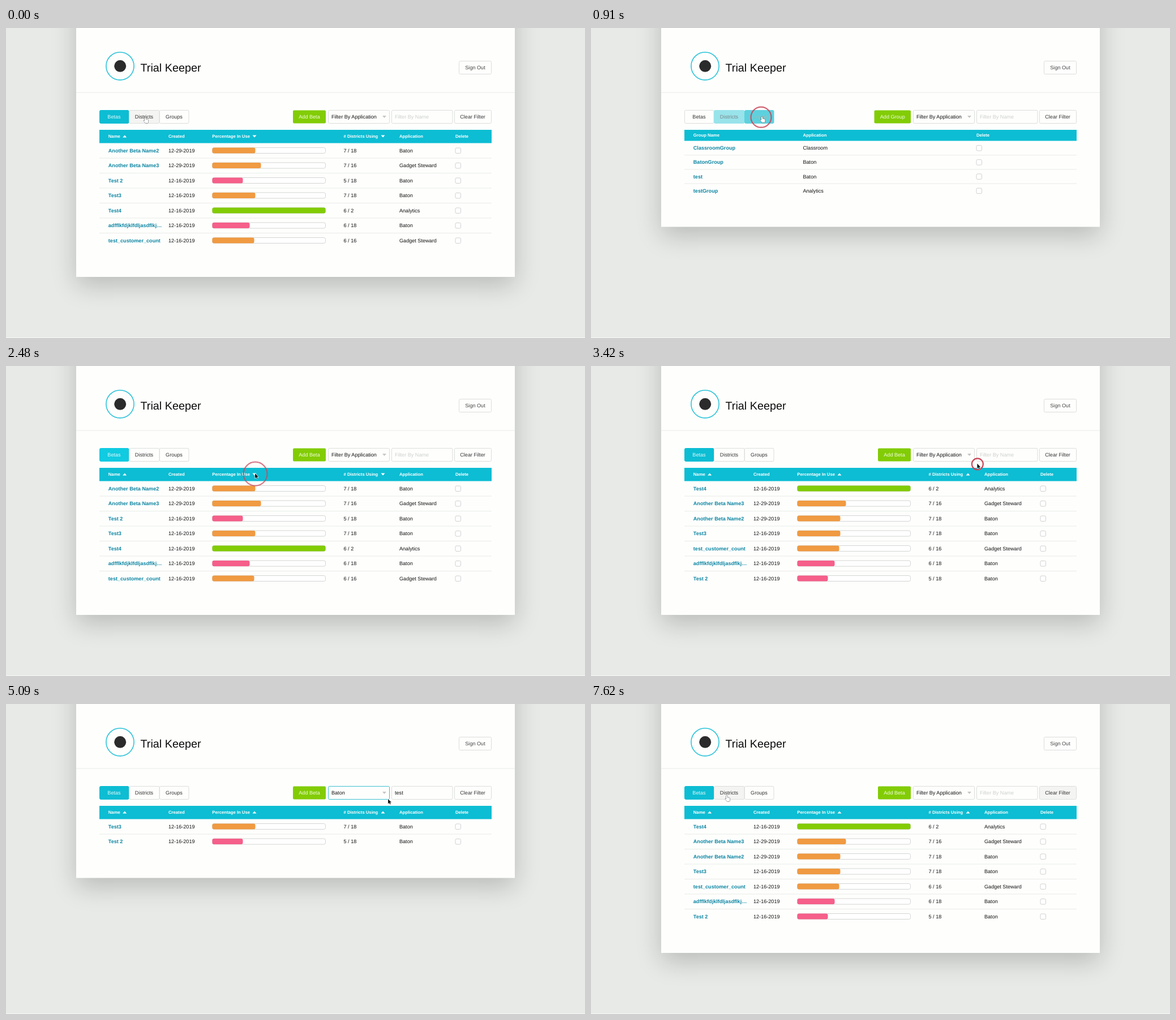
These frames come from a looping animation (1023 by 548 pixels, 8000 ms). An HTML page with a canvas:

```html
<!DOCTYPE html>
<html lang="en">
<head>
<meta charset="utf-8">
<title>Trial Keeper</title>
<style>
  html, body { margin: 0; width: 100%; height: 100%; overflow: hidden; background: #e7eae7; }
  canvas { display: block; }
</style>
</head>
<body>
<canvas id="stage" width="1023" height="548"></canvas>
<script>
const ctx = document.getElementById('stage').getContext('2d');
ctx.textRendering = 'geometricPrecision';

const LOOP = 8000;
const CYAN = [13, 189, 211], BRIGHT = [16, 203, 225], WHITE = [254, 255, 253];
const GREEN = '#82cc06', ORANGE = '#f09a42', PINK = '#f55f8a', BORDER = '#dcdedc';
const ROW_FONT = 9.1, HEAD_FONT = 7.7;

const TICKS = [
  0, 100, 260, 420, 580, 740, 910, 1030, 1160, 1310, 1460, 1610, 1760, 1920, 2070,
  2210, 2340, 2480, 2610, 2750, 2890, 3030, 3160, 3300, 3430, 3570, 3920, 4120, 4250,
  4520, 4660, 4800, 4950, 5090, 6100, 6240, 6380, 6520, 6670, 6840, 7000,
  7180, 7330, 7470, 7620
];

// Pointer tip: time, x, y
const PATH = [
  [0, 244, 158], [300, 244, 158], [740, 300, 157], [1100, 300, 157],
  [1460, 191, 158], [2070, 191, 158], [2340, 440, 190], [2610, 440, 190],
  [2890, 666, 190], [3160, 666, 190], [3430, 697, 157], [4250, 697, 157],
  [4660, 650, 157], [4800, 650, 157], [5090, 675, 168], [5950, 675, 168],
  [6520, 843, 152], [6840, 843, 152], [7000, 354, 138], [7620, 238, 162]
];
const CLICKS = [90, 750, 1500, 2260, 2900, 3300, 4560, 6580];

const BETAS = [
  ['Another Beta Name2', '12-29-2019', 38, '7 / 18', 'Baton'],
  ['Another Beta Name3', '12-29-2019', 43, '7 / 16', 'Gadget Steward'],
  ['Test 2', '12-16-2019', 27, '5 / 18', 'Baton'],
  ['Test3', '12-16-2019', 38, '7 / 18', 'Baton'],
  ['Test4', '12-16-2019', 100, '6 / 2', 'Analytics'],
  ['adfflkfdjklfdljasdflkj…', '12-16-2019', 33, '6 / 18', 'Baton'],
  ['test_customer_count', '12-16-2019', 37, '6 / 16', 'Gadget Steward']
];
const GROUPS = [
  ['ClassroomGroup', 'Classroom'], ['BatonGroup', 'Baton'],
  ['test', 'Baton'], ['testGroup', 'Analytics']
];
const DISTRICTS = Array.from({ length: 18 }, (_, i) =>
  ['District ' + (i + 1), ['Baton', 'Analytics', 'Classroom'][i % 3]]);

const rgb = c => `rgb(${c.map(Math.round).join()})`;
const mix = (a, b, k) => rgb(a.map((v, i) => v + (b[i] - v) * k));

function text(str, x, y, { size = ROW_FONT, color = '#111', bold = false, align = 'left' } = {}) {
  ctx.font = `${bold ? 'bold ' : ''}${size}px "Liberation Sans", Arial, sans-serif`;
  ctx.textAlign = align;
  ctx.fillStyle = color;
  ctx.fillText(str, x, y + size * 0.358);
}

function box(x, y, w, h, r, fill, stroke) {
  ctx.beginPath();
  ctx.roundRect(x, y, w, h, r);
  if (fill) { ctx.fillStyle = fill; ctx.fill(); }
  if (stroke) { ctx.strokeStyle = stroke; ctx.lineWidth = 1; ctx.stroke(); }
}

function line(x1, x2, y, color) {
  ctx.fillStyle = color;
  ctx.fillRect(x1, y, x2 - x1, 1);
}

function triangle(x, y, up, color = '#fff') {
  const d = up ? -2 : 2;
  ctx.beginPath();
  ctx.moveTo(x - 3.5, y - d);
  ctx.lineTo(x + 3.5, y - d);
  ctx.lineTo(x, y + d);
  ctx.fillStyle = color;
  ctx.fill();
}

const inside = (p, x1, x2) => p.x >= x1 && p.x < x2 && p.y >= 145 && p.y < 169;

function pointerAt(t) {
  let i = PATH.findIndex(p => p[0] > t);
  if (i < 0) i = PATH.length;
  const a = PATH[i - 1], b = PATH[i] || a;
  let k = b === a ? 0 : (t - a[0]) / (b[0] - a[0]);
  k = k * k * (3 - 2 * k);
  return { x: a[1] + (b[1] - a[1]) * k, y: a[2] + (b[2] - a[2]) * k };
}

function stateAt(t) {
  const page = t < 260 || t >= 1760 ? 'Beta' : t < 910 ? 'District' : 'Group';
  const names = ['Beta', 'District', 'Group'];
  const active = names.map(n => n === page ? 1 : 0);
  // A tab change takes one refresh to fade through.
  const fades = { 260: [0, 1], 910: [1, 2], 1760: [2, 0] };
  if (fades[t]) {
    active[fades[t][0]] = 0.42;
    active[fades[t][1]] = 0.65;
  }
  const cleared = t >= 6840;
  return {
    page, active,
    bright: t >= 1920 && t < 2610,
    byUse: t >= 2610,
    byDistricts: t >= 3160,
    query: cleared || t < 3920 ? '' : t < 4120 ? 'te' : t < 4250 ? 'tes' : 'test',
    app: t >= 4950 && !cleared ? 'Baton' : '',
    inputFocus: t >= 3430 && t < 4660,
    selectFocus: t >= 4660 && !cleared,
    clearFocus: t >= 6520,
    pointer: pointerAt(t)
  };
}

function card(bottom) {
  ctx.save();
  ctx.shadowColor = 'rgba(0,0,0,.2)';
  ctx.shadowBlur = 42;
  ctx.shadowOffsetY = 15;
  ctx.fillStyle = rgb(WHITE);
  ctx.fillRect(124, -80, 775, bottom + 80);
  ctx.restore();

  ctx.beginPath();
  ctx.arc(201.5, 67.3, 24.6, 0, 7);
  ctx.strokeStyle = '#2cc3d8';
  ctx.lineWidth = 1.6;
  ctx.stroke();
  ctx.beginPath();
  ctx.arc(201.7, 67.3, 10.5, 0, 7);
  ctx.fillStyle = '#2b2b2b';
  ctx.fill();

  text('Trial Keeper', 237.5, 69.5, { size: 19.8, color: '#0a0a0a' });
  box(800.5, 58.5, 57, 23, 2, null, BORDER);
  text('Sign Out', 829, 70, { color: '#444', align: 'center' });
  line(124, 899, 113.5, '#e9ebe9');
}

function toolbar(s) {
  [['Betas', 165, 217], ['Districts', 217, 271], ['Groups', 271, 323]].forEach(([label, x1, x2], i) => {
    const k = s.active[i];
    const base = inside(s.pointer, x1, x2) ? [244, 245, 243] : WHITE;
    const fill = mix(base, s.bright ? BRIGHT : CYAN, k);
    box(x1 + 0.5, 145.5, x2 - x1 - 0.5, 23, 2, fill, k ? fill : BORDER);
    text(label, (x1 + x2) / 2, 157, { color: mix([50, 50, 50], [225, 250, 252], k), align: 'center' });
  });

  const left = { Beta: 507, District: 495, Group: 500.5 }[s.page];
  box(left, 145.5, 565 - left, 23, 2, GREEN);
  text('Add ' + s.page, (left + 565) / 2, 157, { color: '#f4ffe0', align: 'center' });

  const focus = '#3dbfd2';
  box(569.5, 145.5, 108, 23, 2, rgb(WHITE), s.selectFocus ? focus : BORDER);
  text(s.app || 'Filter By Application', 575, 157);
  triangle(668.5, 157, false, '#c4c6c4');

  box(681.5, 145.5, 107.5, 23, 2, rgb(WHITE), s.inputFocus ? focus : BORDER);
  text(s.query || 'Filter By Name', 687, 157, { color: s.query ? '#111' : '#cdd0cd' });

  const grey = s.clearFocus || inside(s.pointer, 792, 858);
  box(792.5, 145.5, 65, 23, 2, grey ? '#f4f5f3' : rgb(WHITE), BORDER);
  text('Clear Filter', 824.5, 157, { color: '#333', align: 'center' });
}

function header(h, labels) {
  ctx.fillStyle = rgb(CYAN);
  ctx.fillRect(165, 180, 693, h);
  const y = 180 + h / 2 - 0.3;
  labels.forEach(([label, x]) => text(label, x, y, { size: HEAD_FONT, bold: true, color: '#fff' }));
}

const link = (str, y) => text(str, 180.8, y, { bold: true, color: '#0c84a2' });
const checkbox = (x, y) => box(x + 0.5, y - 4.5, 9.5, 9.5, 2, '#fff', '#cfd1cf');

function betaTable(rows, s) {
  header(23.5, [['Name', 180.8], ['Created', 287], ['Percentage In Use', 364.3],
    ['# Districts Using', 596.5], ['Application', 695], ['Delete', 794]]);
  triangle(209.7, 191.5, true);
  triangle(439, 191.5, s.byUse);
  triangle(666, 191.5, s.byDistricts);

  rows.forEach(([name, date, pct, count, app], i) => {
    const y = 216.5 + 26.5 * i;
    link(name, y);
    text(date, 287, y);
    box(364.5, y - 5, 200, 10, 3, '#fff', '#d3d5d3');
    box(364.5, y - 5, 2 * pct, 10, 3, pct === 100 ? GREEN : pct > 35 ? ORANGE : PINK);
    text(count, 596.5, y);
    text(app, 695, y);
    checkbox(793.5, y);
    if (i < rows.length - 1) line(165, 858, y + 13, '#e9ebe9');
  });
}

function plainTable(rows, title) {
  header(19.5, [[title + ' Name', 180.8], ['Application', 374.5], ['Delete', 681]]);
  rows.forEach(([name, app], i) => {
    const y = 212 + 25.2 * i;
    link(name, y);
    text(app, 374.5, y);
    checkbox(680.5, y);
    if (i < rows.length - 1) line(165, 858, y + 12.2, '#e9ebe9');
  });
}

function ring(t, p) {
  const start = CLICKS.find(c => t >= c && t - c < 300);
  if (start === undefined) return;
  const age = t - start;
  ctx.beginPath();
  ctx.arc(p.x + 0.5, p.y + 0.7, 10 + age / 20, 0, 7);
  ctx.strokeStyle = `rgba(203,70,88,${1 - 0.6 * (age / 320) ** 2})`;
  ctx.lineWidth = 2.2;
  ctx.stroke();
}

const ARROW = new Path2D('M0 0V8.4L2 6.6L3.3 9.4L4.7 8.8L3.4 6.1H6Z');
const HAND = new Path2D('M1 1Q1-.3 2-.3T3 1V3.6Q4 3 4.7 3.8Q5.7 3.3 6.3 4.2Q7.6 3.9 7.6 5.2V7Q7.6 8.4 6.7 10H2.4L-.7 6.4Q-1.2 5.1 0 5.2L1 6Z');
const BEAM = new Path2D('M-1.5-4.5Q0-4.5 0-3.5Q0-4.5 1.5-4.5M0-3.5V3.5M-1.5 4.5Q0 4.5 0 3.5Q0 4.5 1.5 4.5');

function pointer(p) {
  const hand = inside(p, 165, 323) || inside(p, 792, 858);
  ctx.save();
  ctx.translate(p.x, p.y);
  ctx.lineJoin = 'round';
  if (inside(p, 681, 789)) {
    ctx.strokeStyle = '#333';
    ctx.lineWidth = 0.9;
    ctx.stroke(BEAM);
  } else {
    ctx.strokeStyle = hand ? '#333' : '#fff';
    ctx.fillStyle = hand ? '#fff' : '#111';
    ctx.lineWidth = hand ? 0.9 : 1.2;
    ctx.stroke(hand ? HAND : ARROW);
    ctx.fill(hand ? HAND : ARROW);
  }
  ctx.restore();
}

function draw(t) {
  const s = stateAt(t);
  ctx.fillStyle = '#e7eae7';
  ctx.fillRect(0, 0, 1023, 548);

  if (s.page === 'Beta') {
    const rows = BETAS.filter(r => r[0].toLowerCase().includes(s.query) && (!s.app || r[4] === s.app));
    if (s.byUse) rows.sort((a, b) => b[2] - a[2]);
    card(254.5 + 26.5 * rows.length);
    betaTable(rows, s);
  } else {
    const rows = s.page === 'Group' ? GROUPS : DISTRICTS;
    card(250.7 + 25.2 * rows.length);
    plainTable(rows, s.page);
  }
  toolbar(s);
  ring(t, s.pointer);
  pointer(s.pointer);
  line(0, 1023, 547, '#f6f8f6');
}

const origin = performance.now();
function loop() {
  const t = (performance.now() - origin) % LOOP;
  draw(TICKS.filter(k => k <= t).pop() ?? 0);
  requestAnimationFrame(loop);
}
loop();
</script>
</body>
</html>
```
